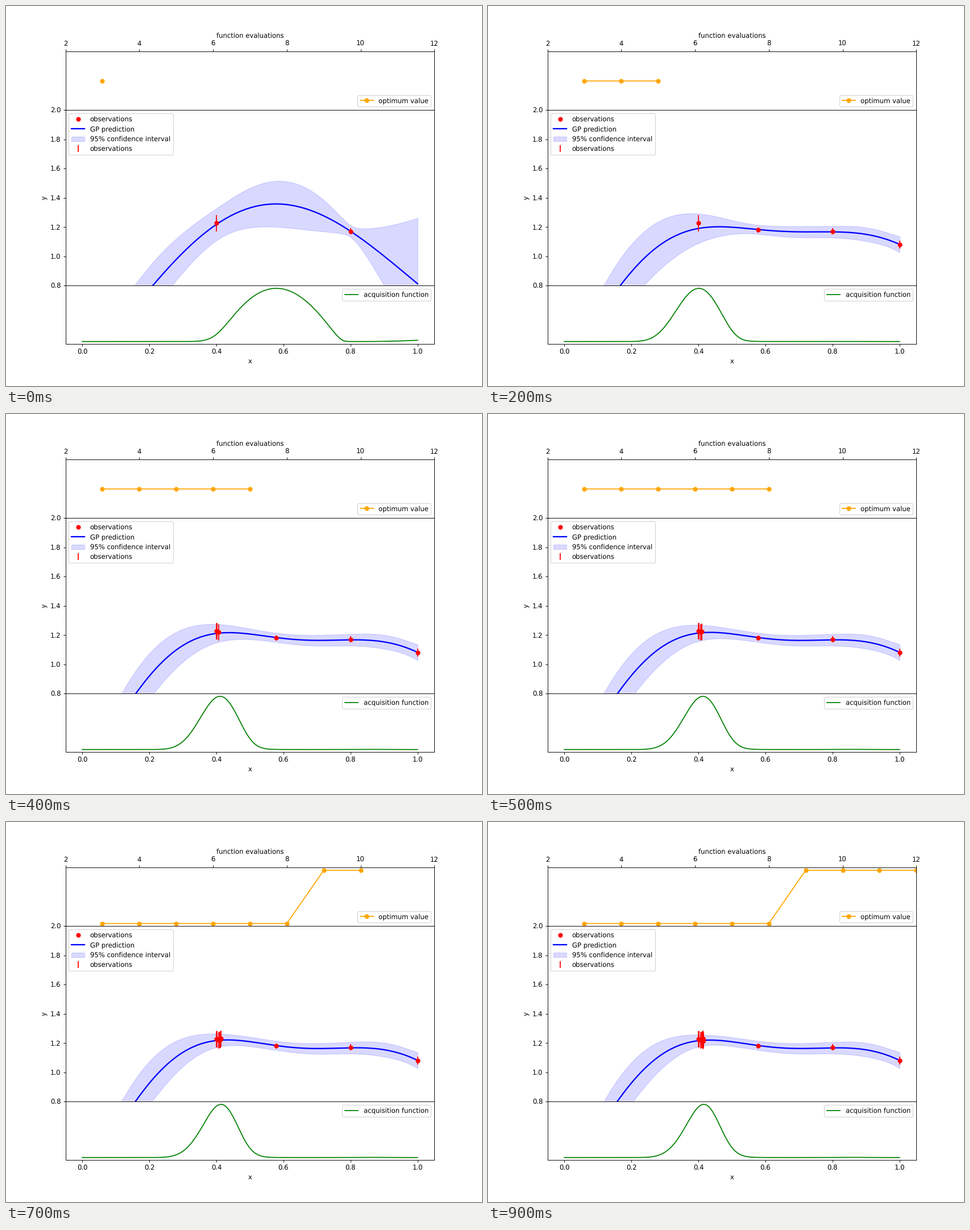
These frames come from a looping animation (837x669 px, 1 s). A matplotlib script:

```python
import math

import matplotlib.pyplot as plt
import numpy as np
from matplotlib.animation import FuncAnimation

WIDTH, HEIGHT, DPI = 837, 669, 83.7
EPS = 1e-6  # keeps the pixel size from being truncated downwards
FRAMES, INTERVAL, FIRST = 10, 100, 3

GRID = np.linspace(0, 1, 501)
LENGTHS = np.geomspace(0.15, 0.9, 140)[:, None, None, None]
SCALES = np.geomspace(0.4, 2.0, 100)[None, :, None, None]

# Smooth objective: the quartic through five key points.
OBJECTIVE = np.polyfit([0, 0.4, 0.578, 0.8, 1], [0.215, 1.228, 1.181, 1.1745, 1.078], 4)


def measure(x, k):
    """Evaluation number k: value with a small growing ripple, and its error."""
    ripple = 0.001 * k * (math.cos(math.pi * k / 2) - 0.3)
    error = 0.013 + 0.015 * x**3 + 0.0425 * math.exp(-((x - 0.4) / 0.08) ** 2)
    return x, np.polyval(OBJECTIVE, x) + ripple, error


def kernel(a, b, scale, length):
    return scale**2 * np.exp(-(a[:, None] - b) ** 2 / (2 * length**2))


def fit(x, y, noise):
    """Scale and length with the highest marginal likelihood."""
    cov = kernel(x, x, SCALES, LENGTHS) + noise
    targets = np.broadcast_to(y[:, None], cov.shape[:2] + (len(y), 1))
    weights = np.linalg.solve(cov, targets)
    score = -(weights[..., 0] @ y) - np.linalg.slogdet(cov)[1]
    i, j = np.unravel_index(score.argmax(), score.shape)
    return SCALES[0, j, 0, 0], LENGTHS[i, 0, 0, 0]


def predict(x, y, err):
    noise = np.diag(err**2)
    scale, length = fit(x, y, noise)
    cov = kernel(x, x, scale, length) + noise
    cross = kernel(GRID, x, scale, length)
    gain = np.linalg.solve(cov, cross.T).T
    var = scale**2 - (gain * cross).sum(axis=1)
    return gain @ y, np.sqrt(np.maximum(var, 1e-12))


def expected_improvement(mean, std, best):
    z = (mean - best) / std
    cdf = np.array([0.5 * (1 + math.erf(v / math.sqrt(2))) for v in z])
    pdf = np.exp(-z**2 / 2) / math.sqrt(2 * math.pi)
    return (mean - best) * cdf + std * pdf


def optimise():
    """Bayesian optimisation: each step measures where the acquisition peaks."""
    data = [measure(x, k) for k, x in enumerate(np.linspace(0, 0.8, FIRST))]
    steps = []
    for _ in range(FRAMES):
        x, y, err = np.array(data).T
        mean, std = predict(x, y, err)
        acquisition = expected_improvement(mean, std, y.max())
        steps.append((x, y, err, mean, std, acquisition))
        data.append(measure(GRID[acquisition.argmax()], len(data)))
    return steps


STEPS = optimise()

plt.rcParams["text.hinting"] = "none"
fig, (top, mid, low) = plt.subplots(
    3, 1, figsize=((WIDTH + EPS) / DPI, (HEIGHT + EPS) / DPI), dpi=DPI,
    gridspec_kw={"height_ratios": [1, 3, 1], "hspace": 0})


def draw_optimum(y):
    best = np.maximum.accumulate(y)[FIRST - 1:]
    top.plot(FIRST + np.arange(len(best)), best, "o-", color="orange", label="optimum value")
    pad = 0.05 * np.ptp(best) or 1
    top.set(xlim=(2, 12), ylim=(best.min() - pad, best.max() + pad), yticks=[],
            xlabel="function evaluations")
    top.xaxis.tick_top()
    top.xaxis.set_label_position("top")
    top.legend(loc="lower right")


def draw_model(x, y, err, mean, std):
    mid.plot(x, y, "ro", label="observations", zorder=3)
    mid.plot(GRID, mean, "b-", lw=2, label="GP prediction")
    mid.fill_between(GRID, mean - 1.96 * std, mean + 1.96 * std,
                     color="blue", alpha=0.15, label="95% confidence interval")
    mid.errorbar(x, y, yerr=err, fmt="none", ecolor="r", label="observations", zorder=3)
    mid.set(xlim=(-0.05, 1.05), ylim=(0.8, 2.0), xticks=[], ylabel="y")
    mid.legend(loc="upper left")


def draw_acquisition(acquisition):
    low.plot(GRID, acquisition, color="green", label="acquisition function")
    low.set(xlim=(-0.05, 1.05), yticks=[], xlabel="x")
    low.legend(loc="upper right")


def draw(i):
    for ax in (top, mid, low):
        ax.clear()
    x, y, err, mean, std, acquisition = STEPS[i]
    draw_optimum(y)
    draw_model(x, y, err, mean, std)
    draw_acquisition(acquisition)
    return []


anim = FuncAnimation(fig, draw, frames=FRAMES, interval=INTERVAL, repeat=True, repeat_delay=0)
plt.show()
```
